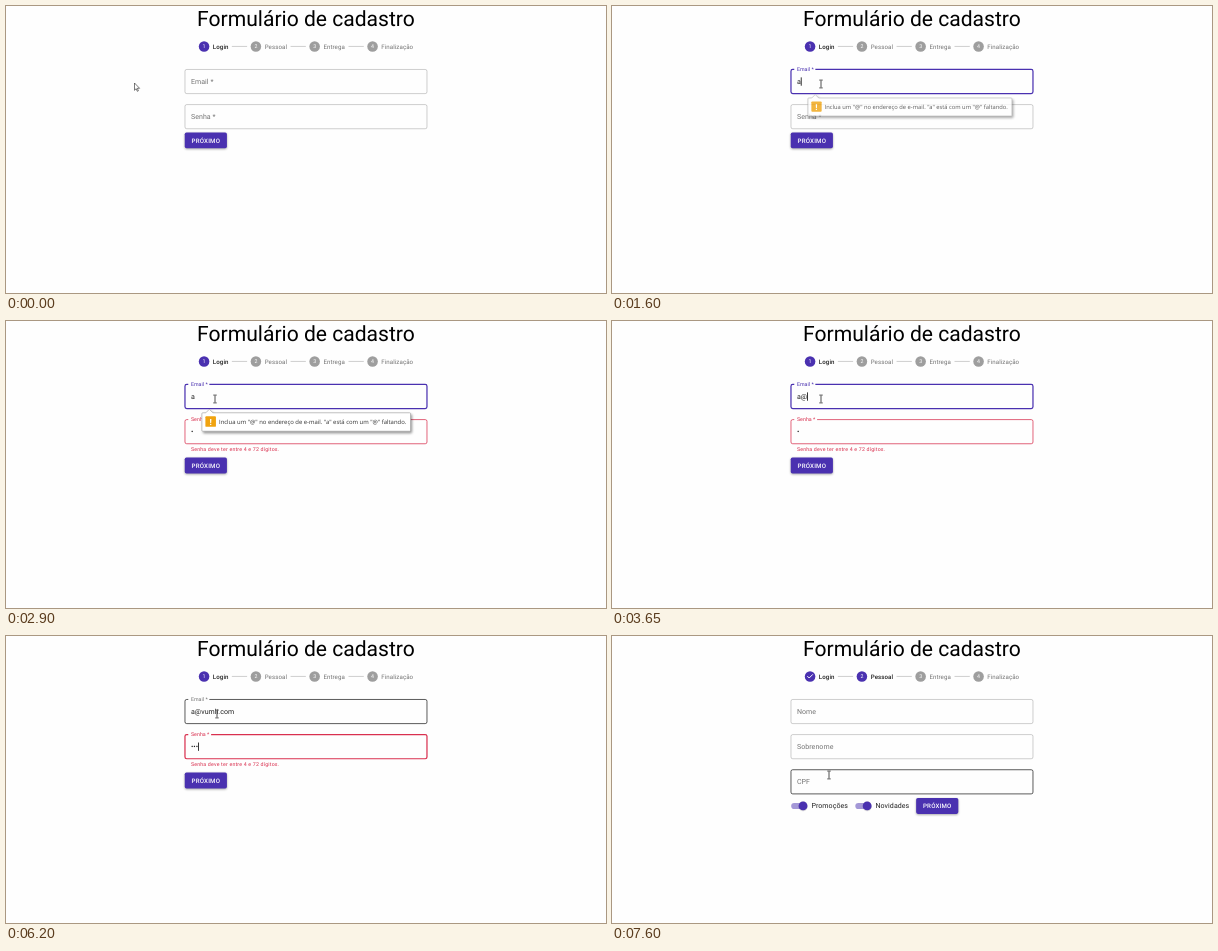
An HTML page that plays this animation: 600 px wide and 287 px high, repeating every 8.15 s.

```html
<!DOCTYPE html>
<html lang="pt-BR">
<head>
<meta charset="utf-8">
<title>Formulário de cadastro</title>
<style>
  html, body { margin: 0; width: 100%; height: 100%; overflow: hidden; background: #fefefe; }
  svg { display: block; width: 100%; height: 100%; }
  text { font: 16px Roboto, sans-serif; letter-spacing: .00938em; fill: rgba(0,0,0,.87); text-rendering: geometricPrecision; }
  .title { font-size: 48px; letter-spacing: 0; fill: #000; text-anchor: middle; }
  .step text { font-size: 14px; letter-spacing: .01071em; fill: rgba(0,0,0,.54); }
  .step circle { fill: #9e9e9e; }
  .step .num { font-size: 12px; letter-spacing: 0; fill: #fff; text-anchor: middle; }
  .step.on circle { fill: #4a31b0; }
  .step.on .name { fill: rgba(0,0,0,.87); font-weight: 500; }
  .check { fill: none; stroke: #fff; stroke-width: 2.2; }
  .button rect { fill: #4a31b0; filter: drop-shadow(0 2px 2px rgba(0,0,0,.35)); }
  .button text { font-size: 14px; font-weight: 500; letter-spacing: .02857em; fill: #fff; text-anchor: middle; }
  .frame { fill: none; }
  .notch { fill: #fefefe; }
  .caret { fill: #000; }
  .picked { fill: #2f7de1; }
  .help { font-size: 12px; letter-spacing: .03333em; fill: #d9304f; }
  .switch rect { fill: #4a31b0; opacity: .5; }
  .switch circle { fill: #4a31b0; filter: drop-shadow(0 1px 1px rgba(0,0,0,.3)); }
  .tip path { fill: #fff; stroke: #a4a4a4; stroke-width: 1.5; filter: drop-shadow(3px 4px 3px rgba(0,0,0,.4)); }
  .tip text { font: 13.45px "Open Sans", sans-serif; letter-spacing: 0; fill: #333; }
  .tip rect { fill: #f0a30f; }
  .tip .mark { font-weight: 700; font-size: 19px; fill: #fff; text-anchor: middle; }
  .pointer path { fill: #fff; stroke: #222; stroke-width: .6; stroke-linejoin: round; }
  .pointer .beam { fill: none; stroke: #222; stroke-width: .8; }
</style>
</head>
<body>
<svg viewBox="0 0 600 287" preserveAspectRatio="none">
  <defs><clipPath id="clip"><rect width="96" height="36" rx="4"/></clipPath></defs>
  <g transform="scale(.4392)">
    <text class="title" x="683" y="44.5">Formulário de cadastro</text>
    <g id="steps"></g>
    <g id="login"></g>
    <g id="personal"></g>
    <g id="tip" class="tip">
      <path d="M448 209h7l8-8 8 8h448q2 0 2 2v38q0 2-2 2h-471q-2 0-2-2v-38q0-2 2-2z"/>
      <rect x="454" y="217" width="24" height="24" rx="2"/>
      <text class="mark" x="466" y="236">!</text>
      <text x="485" y="234.5">Inclua um "@" no endereço de e-mail. "a" está com um "@" faltando.</text>
    </g>
  </g>
  <g id="pointer" class="pointer">
    <path id="arrow" d="M0 0v7.3l1.7-1.6 1.1 2.6 1.1-.5-1.1-2.5h2.3z"/>
    <path id="beam" class="beam" d="M-1.7-3.9h1.2l.5.4.5-.4h1.2M0-3.5v7M-1.7 3.9h1.2l.5-.4.5.4h1.2"/>
    <path id="hand" d="M-.8 0q.8-.7 1.5 0v3l3 .7q.8.3.7 1.3l-.7 3h-4l-2.6-3.2q.3-1 1.3-.3l.8.6z"/>
  </g>
</svg>
<script>
const LOOP = 8150, LEFT = 407;
const MAIN = '#4a31b0', RED = '#d9304f', DARK = 'rgba(0,0,0,.87)', GREY = 'rgba(0,0,0,.54)', LINE = 'rgba(0,0,0,.26)';
const KEYS = [800, 3450, 3700, 3850, 4000, 4150, 4300, 4500, 4700, 4850, 5000];
const CARET = [[600, 1150], [1450, 2850], [3400, 5250], [5800, 6650]];
const PATH = [[0, 128.5, 77], [400, 128.5, 77], [460, 209, 78], [5250, 209, 78], [5450, 211, 78],
  [6350, 211, 78], [6600, 217, 140], [7550, 217, 140], [7600, 217, 139]];

const $ = id => document.getElementById(id);
const within = (t, a, b) => t >= a && t < b;
const ramp = (t, start, span) => Math.min(1, Math.max(0, (t - start) / span));
const easeOut = p => 1 - (1 - p) ** 2;
const show = (el, on) => el.style.display = on ? '' : 'none';

function add(parent, tag, attrs = {}, text = '') {
  const el = document.createElementNS('http://www.w3.org/2000/svg', tag);
  for (const k in attrs) el.setAttribute(k, attrs[k]);
  el.textContent = text;
  return parent.appendChild(el);
}
function set(el, attrs) {
  for (const k in attrs) el.setAttribute(k, attrs[k]);
}

function makeStep([name, x], i) {
  const g = add($('steps'), 'g', { class: 'step' });
  if (i) add(g, 'path', { d: `M${x - 54.8} 92h34.8`, stroke: '#bdbdbd', 'stroke-width': 1.7 });
  add(g, 'circle', { cx: x, cy: 92, r: 12 });
  const num = add(g, 'text', { class: 'num', x, y: 96.3 }, i + 1);
  const check = add(g, 'path', { class: 'check', d: `M${x - 6.3} 91.3l4.3 4.3 8.3-8.3` });
  add(g, 'text', { class: 'name', x: x + 20, y: 97 }, name);
  return { g, num, check };
}

function makeField(parent, top, name, notch = 0) {
  const x = LEFT + 14;
  const frame = add(parent, 'rect', { class: 'frame', x: LEFT + .5, y: top + .5, width: 551, height: 55, rx: 4 });
  const gap = add(parent, 'rect', { class: 'notch', y: top - 3, height: 7 });
  const label = add(parent, 'text', {}, name);
  const picked = add(parent, 'rect', { class: 'picked', x, y: top + 18.5, width: 5.5, height: 19 });
  const value = add(parent, 'text', { x, y: top + 33.5 });
  const caret = add(parent, 'rect', { class: 'caret', y: top + 18.5, width: 1.8, height: 19 });
  return ({ text = '', focus, hover, bad, lift = 0, cursor, selected }) => {
    const tone = bad ? RED : focus ? MAIN : '';
    set(frame, { stroke: tone || (hover ? DARK : LINE), 'stroke-width': focus ? 2.8 : 1.7 });
    set(gap, { x: LEFT + 8, width: notch * lift });
    label.setAttribute('transform', `translate(${x} ${top + 33.5 - 29.4 * lift}) scale(${1 - .25 * lift})`);
    label.style.fill = tone || GREY;
    value.textContent = text;
    value.style.fill = selected ? '#fff' : '';
    show(picked, selected);
    show(caret, focus && cursor);
    caret.setAttribute('x', x + (text ? value.getComputedTextLength() : 0));
  };
}

function makeButton(parent, x, y) {
  const g = add(parent, 'g', { class: 'button', transform: `translate(${x} ${y})` });
  add(g, 'rect', { width: 96, height: 36, rx: 4 });
  const wave = add(g, 'circle', { cx: 87, cy: 28, r: 0, fill: '#fff', 'fill-opacity': .25, 'clip-path': 'url(#clip)' });
  add(g, 'text', { x: 48, y: 23 }, 'PRÓXIMO');
  return { g, wave };
}

function makeSwitch(parent, x, name) {
  const g = add(parent, 'g', { class: 'switch' });
  add(g, 'rect', { x, y: 380, width: 34, height: 14, rx: 7 });
  add(g, 'circle', { cx: x + 27, cy: 387, r: 10 });
  add(g, 'text', { x: x + 46, y: 392.5 }, name);
}

const steps = [['Login', 451], ['Pessoal', 569], ['Entrega', 702.7], ['Finalização', 834.6]].map(makeStep);
const login = $('login'), personal = $('personal');
const email = makeField(login, 144, 'Email *', 48);
const password = makeField(login, 224, 'Senha *', 52);
const help = add(login, 'text', { class: 'help', x: 421, y: 296 }, 'Senha deve ter entre 4 e 72 dígitos.');
const next = makeButton(login, LEFT, 288);
const firstName = makeField(personal, 144, 'Nome');
const lastName = makeField(personal, 224, 'Sobrenome');
const taxId = makeField(personal, 304, 'CPF');
makeSwitch(personal, 408, 'Promoções');
makeSwitch(personal, 554, 'Novidades');
makeButton(personal, 692.5, 369);

function drawPointer(t) {
  const i = PATH.findLastIndex(p => p[0] <= t);
  const [t0, x0, y0] = PATH[i], [t1, x1, y1] = PATH[i + 1] || [LOOP, x0, y0];
  const p = ramp(t, t0, t1 - t0), x = x0 + (x1 - x0) * p, y = y0 + (y1 - y0) * p;
  const kind = x < 179 ? 'arrow' : within(t, 6585, 6850) ? 'hand' : 'beam';
  for (const id of ['arrow', 'beam', 'hand']) show($(id), id === kind);
  $('pointer').setAttribute('transform', `translate(${x} ${y})`);
}

function drawTip(t) {
  const [start, end] = t < 2450 ? [1450, 1850] : [2450, 3450];
  const scale = .95 + .05 * easeOut(ramp(t, start, 450));
  set($('tip'), {
    opacity: ramp(t, start, 190) * (1 - ramp(t, end, 117)),
    transform: `translate(450 229) scale(${scale}) translate(-450 -229)`
  });
}

function draw(t) {
  const second = t >= 6800, bad = within(t, 2450, 6650);
  const cursor = CARET.some(([a, b]) => within(t, a, b));
  const dots = t < 5800 ? +(t >= 2250) : 1 + [5950, 6050, 6250].filter(k => k <= t).length;

  steps.forEach(({ g, num, check }, i) => {
    g.classList.toggle('on', i <= +second);
    show(num, !(second && i === 0));
    show(check, second && i === 0);
  });
  show(login, !second);
  show(personal, second);

  email({
    text: 'a@vumli.com'.slice(0, KEYS.filter(k => k <= t).length),
    focus: within(t, 460, 1850) || within(t, 2450, 5250),
    hover: within(t, 435, 6390),
    lift: easeOut(ramp(t, 460, 190)),
    cursor
  });
  password({
    text: '•'.repeat(dots),
    focus: within(t, 1850, 2450) || within(t, 5250, 6650),
    lift: easeOut(ramp(t, 1850, 200)),
    selected: within(t, 5250, 5800),
    bad, cursor
  });
  show(help, bad);
  next.g.setAttribute('transform', `translate(${LEFT} ${bad ? 311 : 288})`);
  next.wave.setAttribute('r', 100 * easeOut(ramp(t, 6650, 300)));
  firstName({});
  lastName({});
  taxId({ hover: t >= 6850 });
  drawTip(t);
  drawPointer(t);
}

function tick() {
  draw(performance.now() % LOOP);
  requestAnimationFrame(tick);
}
tick();
</script>
</body>
</html>
```
